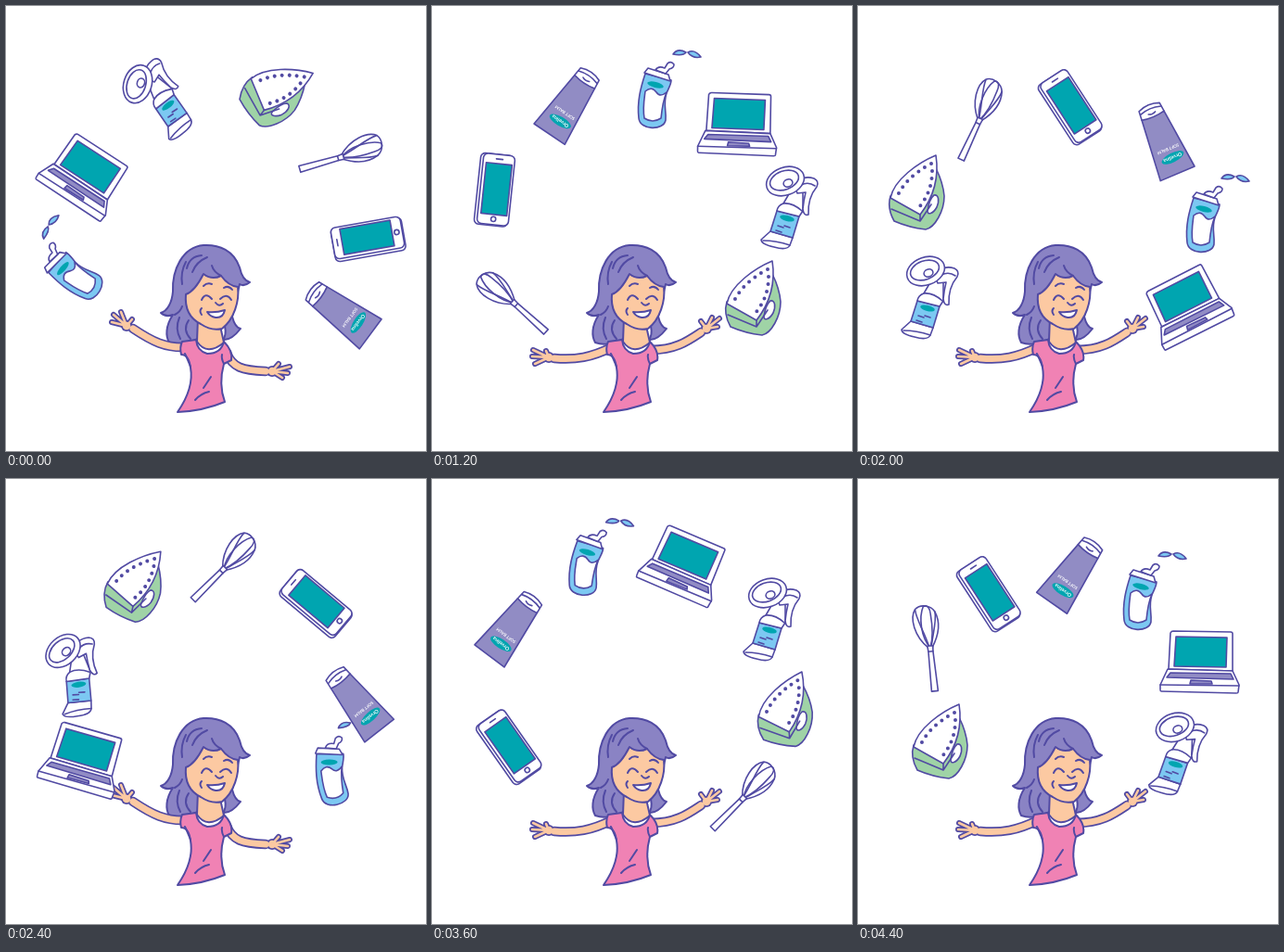
An HTML page for the animation above (4.8 s loop, 453 px wide and 480 px high).

```html
<!DOCTYPE html>
<html lang="en">
<head>
<meta charset="utf-8">
<title>Juggling</title>
<style>
  html, body { margin: 0; width: 100%; height: 100%; overflow: hidden; background: #fff; }
  svg { display: block; width: 100vw; height: 100vh; }
  .ink { fill: none; stroke: #514aa3; stroke-width: 1.6; stroke-linecap: round; stroke-linejoin: round; }
  .bold { stroke-width: 2; }
  .w { fill: #fff; }
  .teal { fill: #00a5b0; }
  .purple { fill: #918cc4; }
  .hair { fill: #8a83c4; }
  .skin { fill: #fcc9a2; }
  .pink { fill: #f082b4; }
  .green { fill: #9fd3a6; }
  .blue { fill: #7cc8f2; }
  .dark { fill: #514aa3; stroke: none; }
  .bare { stroke: none; }
  text { font-family: Lato, sans-serif; font-weight: 700; fill: #fff; stroke: none; text-anchor: middle; }
</style>
</head>
<body>
<svg viewBox="0 0 453 480" preserveAspectRatio="none">
  <g id="woman" class="ink bold"></g>
  <g id="props" class="ink"></g>
</svg>
<script>
const STEP = 400, LOOP = 4800;
const path = (d, cls = '', extra = '') => `<path class="${cls}" d="${d}" ${extra}/>`;
const oval = (x, y, rx, ry, cls = '', turn = 0) =>
  `<ellipse class="${cls}" rx="${rx}" ry="${ry}" transform="translate(${x} ${y}) rotate(${turn})"/>`;
const box = (x, y, w, h, r, cls) =>
  `<rect class="${cls}" x="${x}" y="${y}" width="${w}" height="${h}" rx="${r}"/>`;

const art = {
  laptop:
    path('M-29-33L33-32Q35-32 35-30L35 10L-34 8L-32-31Q-31-33-29-33Z', 'w') +
    path('M-26-27L29-26L28 6L-28 5Z', 'teal') +
    path('M-35 8L35 10L42 25L41 33Q41 34 39 34L-42 32Q-43 32-43 30L-43 25Z', 'w') +
    path('M-32 12L33 13L36 19L-36 17Z', 'purple') +
    path('M-10 20L12 21L13 24L-11 24Z', 'purple') +
    path('M-43 25L42 26'),

  bottle:
    path('M-11-25C-16-10-20 5-18 23C-17 36 9 37 11 25C12 15 8 8 12-4C15-11 17-14 17-18Z', 'blue') +
    path('M-11-6Q-4-12 1-5Q5 1 12-5C8 4 7 13 6 23Q-3 29-12 23C-14 12-12 2-11-6Z', 'w') +
    oval(0, -13, 9, 3, 'teal bare', 14) +
    path('M-8-31L14-24L16-17L-12-26Z', 'w') +
    path('M0-29Q3-34 10-31L13-36Q17-39 20-35Q20-31 15-30L11-25Z', 'w') +
    path('M19-46Q24-53 33-48Q30-44 19-46Z', 'blue') +
    path('M35-48Q42-52 49-43Q40-41 35-48Z', 'blue'),

  tube:
    path('M-13-28L13-28L20 40L-20 40Z', 'purple') +
    path('M-12-38Q0-43 12-38L13-28Q0-25-13-28Z', 'w') +
    path('M-12-34Q0-38 12-34M-4-31Q0-29 4-31') +
    oval(2, 22, 13, 5, 'teal bare', -4) +
    '<g transform="rotate(180)"><text x="-2" y="-20" font-size="5.5">Orvelina</text>' +
    '<text x="-1" y="-10" font-size="4.5">SOFT BALM</text></g>',

  phone:
    box(-20, -38, 36, 77, 5, 'w') +
    box(-17, -38, 34, 76, 5, 'w') +
    box(-13.5, -28, 28, 55, 0, 'teal') +
    oval(0.5, 32, 2.6, 2.6) +
    path('M-3-33L4-33'),

  whisk:
    path('M0-2C14-16 34-19 43-12C48-6 46 5 38 9C26 14 12 10 0 2', 'w') +
    path('M0 0C12-9 34-9 45-3C47 2 42 4 36 4C22 5 10 4 0 0') +
    path('M0-1C16-4 32-12 42-12M0 1C14 4 28 10 38 9') +
    path('M-47-3.5L-4-2.5L2-3L2 3L-4 2.5L-47 3.5Z', 'w') +
    path('M-4-2.5L-4 2.5'),

  iron:
    path('M-28 4C-31 14-28 24-24 31Q-8 38 10 40C20 38 30 20 30 4C29-8 26-16 21-26Z', 'green') +
    path('M19 3C24 2 25 9 22 16C18 23 12 25 12 20C13 13 15 6 19 3Z', 'w') +
    path('M-27 18L4 31M4 24L4 31L16 13') +
    path('M21-40C2-32-24-14-28 6L4 24C18 6 25-14 21-40Z', 'w') +
    path('M16-31Q-12-16-21 5M17-23Q17 0 2 17', '', 'stroke-width="4" stroke-dasharray="0 8"'),

  pump:
    path('M-20 28L-30 37Q-30 42-16 45Q-2 49 1 43L4 35Z', 'w') +
    path('M-28 38Q-14 38 1 43') +
    path('M-13 6L11 12L4 35L-20 28Z', 'blue') +
    oval(-2, 14, 8, 3, 'teal bare', 14) +
    path('M-12 22L-6 24M-14 27L-8 29M-5 22L1 24') +
    path('M-13 6Q-12 0-6-2L1-14L15-19L15 6L11 12Z', 'w') +
    path('M-6-2Q4-3 14 6') +
    path('M6-22Q14-33 27-29Q33-26 30-20Q20-8 21 10Q16 12 15 4Q16-6 18-14L9-13Z', 'w') +
    path('M13-22Q21-26 28-21') +
    oval(-4, -26, 21, 15, 'w', -20) +
    oval(-5, -27, 16, 10, 'w', -20) +
    oval(-1, -24, 5, 4, '', -20)
};

// x, y, turn for each of the seven stops around the ring
const poses = {
  laptop: [[85, 182, 32], [165, 112, 27], [272, 92, 22], [330, 127, 1], [369, 197, 0], [354, 323, -28], [83, 302, 15]],
  bottle: [[73, 289, -63], [84, 200, -30], [167, 92, 2], [241, 98, 0], [305, 129, 0], [373, 232, 0], [352, 318, -15]],
  tube: [[361, 330, -53.5], [86, 302, 42], [86, 159, 37], [149, 105, 34], [232, 101, 35], [329, 144, -23], [378, 240, -38]],
  phone: [[390, 250, -100], [352, 332, -60], [84, 288, -35], [69, 198, 6], [142, 123, -33], [230, 108, -33], [335, 133, -50]],
  whisk: [[362, 163, -16], [390, 247, -28], [336, 344, -45], [88, 320, -138], [78, 182, -96], [131, 123, -65], [235, 97, -45]],
  iron: [[290, 91, 38], [355, 152, 18], [380, 249, -3], [346, 315, 0], [88, 283, 0], [63, 201, 0], [138, 113, 12]],
  pump: [[165, 97, -52], [268, 97, -25], [366, 149, 0], [385, 215, 0], [345, 294, 2], [77, 312, 0], [75, 208, -22]]
};

// Arm and fingers: a wide ink stroke under a narrower skin stroke
function limb(arm, palm, tips) {
  const fingers = tips.map(t => `M${palm}L${t}`).join('');
  const layer = (color, a, p, f) =>
    `<g stroke="${color}">${path(arm, '', `stroke-width="${a}"`)}` +
    `${path(`M${palm}h.1`, '', `stroke-width="${p}"`)}${path(fingers, '', `stroke-width="${f}"`)}</g>`;
  return layer('#514aa3', 10.5, 12, 6) + layer('#fcc9a2', 7, 8.5, 2.6);
}

const arms = [
  limb('M194 368C172 369 158 362 137 348', '130 345', ['114 341', '116 333', '124 330', '136 338']) +
  limb('M238 374C244 390 255 393 280 394', '287 394', ['294 386', '306 389', '304 396', '298 401']),
  limb('M194 368C172 379 155 382 132 380', '126 379', ['109 371', '108 378', '111 386', '123 372']) +
  limb('M236 371C262 371 275 362 290 352', '296 348', ['290 340', '302 336', '310 337', '308 346'])
];

document.getElementById('woman').innerHTML =
  path('M213 258C190 260 179 285 180 308C179 320 174 329 167 331Q172 336 180 333C172 345 172 356 176 363' +
       'Q190 368 208 358L236 345Q238 355 234 360Q243 361 253 348Q247 347 244 335L252 300Q257 303 263 298' +
       'Q255 296 252 282C246 264 230 257 213 258Z', 'hair') +
  path('M187 336Q182 348 188 359M197 339Q190 349 199 359M182 333Q188 330 190 324') +
  arms.map(a => `<g class="arms">${a}</g>`).join('') +
  path('M207 336L206 362Q217 378 235 363L231 345Z', 'skin') +
  path('M190 362Q187 368 189 376Q197 376 199 390Q203 412 185 438Q212 437 236 427Q229 408 235 386L243 382' +
       'Q245 372 235 362Q232 375 217 375Q206 372 205 360Z', 'pink') +
  path('M221 400L213 412M219 416Q210 418 204 425M235 386Q232 380 233 376M199 389Q195 379 193 375') +
  path('M213 289C206 303 200 309 194 311Q192 334 210 343Q222 351 233 348C246 338 252 318 250 303' +
       'Q240 302 232 291Q222 296 213 289Z', 'skin') +
  path('M195 283Q198 270 211 269M201 287Q205 276 217 271M190 300Q188 287 194 276M232 291Q224 287 222 280') +
  path('M213 302Q217 298 222 300M235 304Q240 301 244 306') +
  path('M211 317Q215 308 222 316M231 316Q238 309 243 317') +
  path('M226 320Q230 325 234 321') +
  path('M217 330Q227 331 236 328Q234 337 226 336Q220 335 217 330Z', 'w') +
  path('M211 326Q208 329 211 333');

const props = document.getElementById('props');
props.innerHTML = Object.keys(art).map(k => `<g id="${k}">${art[k]}</g>`).join('');
const items = Object.keys(art).map(k => [document.getElementById(k), poses[k]]);
const armSets = document.querySelectorAll('.arms');
const start = performance.now();

// Poses hold for one step, then jump
function draw(now) {
  const step = Math.floor(Math.max(0, now - start) % LOOP / STEP);
  for (const [el, stops] of items) {
    const [x, y, turn] = stops[step % stops.length];
    el.setAttribute('transform', `translate(${x} ${y}) rotate(${turn})`);
  }
  armSets.forEach((el, i) => el.setAttribute('visibility', i === step % 2 ? 'visible' : 'hidden'));
  requestAnimationFrame(draw);
}
draw(start);
</script>
</body>
</html>
```
